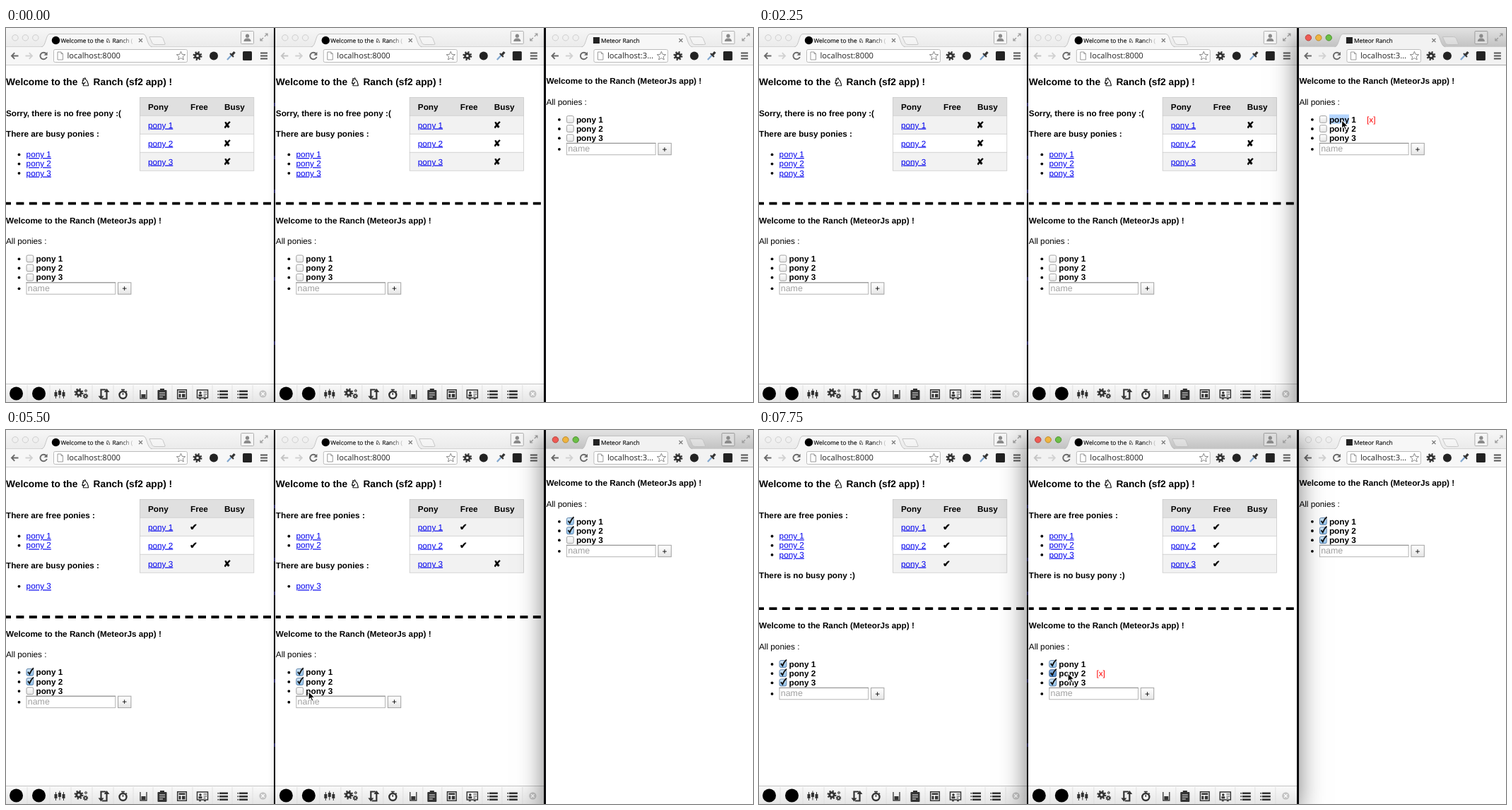
These frames come from a looping animation (1057x530 px, 8000 ms). An HTML page:

```html
<!DOCTYPE html>
<html lang="en">
<head>
<meta charset="utf-8">
<title>Pony ranch</title>
<style>
html, body { margin: 0; width: 100%; height: 100%; overflow: hidden; background: #08080c; }
#stage { position: relative; width: 1057px; height: 530px; overflow: hidden; }
svg { display: block; position: absolute; left: 0; top: 0; }
.speck { position: absolute; left: 379px; width: 2px; height: 5px; background: #3c3a78; }
.win { position: absolute; top: 0; height: 530px; background: #fff; box-shadow: 0 4px 10px rgba(0,0,0,.2); }
.win > svg { overflow: hidden; }
.win.active { z-index: 2; box-shadow: 0 12px 36px rgba(0,0,0,.6); }
text { font: 11.76px "Liberation Sans", Arial, sans-serif; white-space: pre; text-rendering: geometricPrecision; }
.b { font-weight: bold; }
.h { font-weight: bold; font-size: 13.76px; }
.knight { font: 16px "DejaVu Sans", sans-serif; stroke: #000; stroke-width: .5; }
.mark { font: 13px "DejaVu Sans", sans-serif; stroke: #000; stroke-width: .4; }
.link { fill: #00e; text-decoration: underline; }
.x { fill: #f00; }
.hint { fill: #a0a0a0; font-size: 12.4px; }
.tab { font: 8.4px "Open Sans", "Noto Sans", sans-serif; fill: url(#fade); stroke: url(#fade); stroke-width: .2; }
.url { font: 11.2px "Open Sans", "Noto Sans", sans-serif; fill: #222; }
.strip { fill: url(#idle); }
.active .strip { fill: url(#live); }
.bar { fill: #f7f7f7; }
.active .bar { fill: #f2f2f2; }
.edge { stroke: #cfcfcf; }
.active .edge { stroke: #a6a6a6; }
.user { fill: #f5f5f5; stroke: #b0b0b0; }
.active .user { fill: #dcdcdc; stroke: #9c9c9c; }
.light { fill: #f0f0f0; stroke: #cfcfcf; }
.active .l0 { fill: #ee5a54; stroke: #b9423b; }
.active .l1 { fill: #efb440; stroke: #bd8a28; }
.active .l2 { fill: #6cbf46; stroke: #4a922d; }
#cursor { z-index: 5; overflow: visible; }
</style>
</head>
<body>
<div id="stage">
  <svg width="0" height="0">
    <defs>
      <linearGradient id="idle" x2="0" y2="1"><stop stop-color="#f6f6f6"/><stop offset="1" stop-color="#ebebeb"/></linearGradient>
      <linearGradient id="live" x2="0" y2="1"><stop stop-color="#e2e2e2"/><stop offset="1" stop-color="#c2c2c2"/></linearGradient>
      <linearGradient id="off" x2="0" y2="1"><stop stop-color="#fff"/><stop offset="1" stop-color="#e6e6e6"/></linearGradient>
      <linearGradient id="on" x2="0" y2="1"><stop stop-color="#d9ecfa"/><stop offset="1" stop-color="#8cc0ec"/></linearGradient>
      <linearGradient id="down" x2="0" y2="1"><stop stop-color="#93b9e2"/><stop offset="1" stop-color="#4583c8"/></linearGradient>
      <linearGradient id="foot" x2="0" y2="1"><stop stop-color="#fafafa"/><stop offset="1" stop-color="#e6e6e6"/></linearGradient>
      <linearGradient id="fade" gradientUnits="userSpaceOnUse" x1="160" x2="182" y1="0" y2="0"><stop stop-color="#111"/><stop offset="1" stop-color="#111" stop-opacity="0"/></linearGradient>
    </defs>
  </svg>
  <svg id="cursor" width="12" height="16"><path d="M.6.6V12.4L3.4 9.9 5.3 14.3 7.4 13.4 5.6 9.2H9.4Z" stroke="#fff" stroke-width="1.1"/></svg>
</div>
<script>
const stage = document.getElementById('stage');
const cursor = document.getElementById('cursor');
const LOOP = 8000;
const LINE = 13.2;

// Each step changes some fields and keeps the rest. hover and press are [window, row].
const steps = [
  [0, { free: 0, active: -1, at: null, hover: null, press: null, picked: false }],
  [500, { at: [850, 182] }],
  [750, { at: [838, 139] }],
  [1000, { at: [825, 127] }],
  [1250, { at: [824, 130] }],
  [1500, { active: 2 }],
  [2000, { free: 1, hover: [2, 0], picked: true }],
  [2250, { free: 0 }],
  [3000, { free: 1, picked: false }],
  [3500, { at: [818, 139], hover: [2, 1] }],
  [3750, { at: [816, 143] }],
  [4000, { at: [816, 144], press: [2, 1] }],
  [4250, { free: 2, press: null }],
  [4750, { at: [515, 349], hover: null }],
  [5000, { at: [478, 353] }],
  [5250, { at: [431, 369] }],
  [5500, { at: [427.5, 370] }],
  [6000, { active: 1 }],
  [6500, { press: [1, 2], hover: [1, 2] }],
  [6750, { free: 3, press: null }],
  [7250, { at: [444, 353] }],
  [7500, { at: [440, 346], hover: [1, 1] }],
  [7750, { at: [436.5, 344], press: [1, 1] }]
];

// y is the middle of the line of text
const text = (x, y, s, cls = '') => `<text x="${x}" y="${y + 4.2}" class="${cls}">${s}</text>`;
const box = (x, y, w, h, more) => `<rect x="${x}" y="${y}" width="${w}" height="${h}" ${more}/>`;
const rect = (x, y, w, h, fill, more = '') => box(x, y, w, h, `fill="${fill}" ${more}`);
const circle = (x, y, r, fill, more = '') => `<circle cx="${x}" cy="${y}" r="${r}" fill="${fill}" ${more}/>`;
const line = (d, color, w = 1.5) => `<path d="${d}" fill="none" stroke="${color}" stroke-width="${w}"/>`;
const shape = (d, fill) => `<path d="${d}" fill="${fill}"/>`;
const bullet = y => circle(18.5, y + .5, 1.9, '#000');
const isAt = (spot, win, row) => spot && spot[0] === win && spot[1] === row;

function gear(x, y, r, hole) {
  const teeth = `stroke="#333" stroke-width="${r * .5}" stroke-dasharray="${r * .393}"`;
  return circle(x, y, r, 'none', teeth) + circle(x, y, r * .6, 'none', `stroke="#333" stroke-width="${r * .6}"`) + circle(x, y, r * .3, hole);
}

function tools(s) {
  return gear(271 + s, 39.5, 5.2, '#f7f7f7')
    + circle(294 + s, 39.5, 6, '#222')
    + line(`M${313 + s} 45l6-6.5`, '#7fa6cf', 2.2) + line(`M${317 + s} 36l5 5`, '#333', 2) + line(`M${320 + s} 38l3.5-4`, '#333', 3.4)
    + rect(335 + s, 33, 13, 13, '#222', 'rx="1.5"')
    + line(`M${360 + s} 35.5h10m-10 4h10m-10 4h10`, '#555', 1.8);
}

function chrome(win, width) {
  const small = win === 2, s = small ? -84.5 : 0;
  const back = win === 1 ? '#c4c4c4' : '#6a6a6a';
  const boxEnd = 257 + s, star = 247.5 + s;
  let out = box(-1, 0, width + 1, 27, 'class="strip"');
  [0, 1, 2].forEach(i => out += `<circle class="light l${i}" cx="${13 + 14.4 * i}" cy="13.8" r="4.2"/>`);
  out += `<path d="M203 12.5H218Q221 12.5 222 14.5L225 22Q226 23.5 223 23.5H211Q208 23.5 207 21.5L203.5 14Q203 12.5 203 12.5Z" fill="#fff" fill-opacity=".35" stroke="#bdbdbd" stroke-width=".8"/>`;
  out += box(-1, 26.5, width + 1, 26, 'class="bar"') + line(`M-1 26.5H${width}`, '#c9c9c9', .7);
  out += `<path class="bar" d="M50 27C57 26 56 8.5 62 8.5H194C200 8.5 199 26 207 27" stroke="#b9b9b9" stroke-width=".8"/>`;
  out += box(50, 27, 157, 2, 'class="bar"') + `<path class="edge" d="M-1 52.5H${width}"/>`;
  out += small
    ? rect(66.5, 13, 9, 9, '#222') + text(77.5, 16.3, 'Meteor Ranch', 'tab')
    : circle(70.5, 17.5, 5.7, '#000') + text(77.5, 16.3, 'Welcome to the ♘ Ranch (', 'tab');
  out += line('M188 15l5 5m0-5l-5 5', '#777', 1.1);

  const user = 332 + (small ? -84 : 0), full = 365 + (small ? -82.5 : 0);
  out += box(user + .5, 4.5, 18, 18, 'class="user" rx="1"')
    + circle(user + 9.5, 11.2, 2.6, '#8a8a8a') + shape(`M${user + 4.5} 19q0-4.5 5-4.5t5 4.5Z`, '#8a8a8a')
    + line(`M${full + 1} 12l4-4m-3.5 0h3.5v3.5M${full - 1} 14l-4 4m0-3.5v3.5h3.5`, '#9a9a9a', 1.2);

  out += line('M17.5 39.5H8m4.2-4.3L8 39.5l4.2 4.3', back, 1.9)
    + line('M27.5 39.5H37m-4.2-4.3L37 39.5l-4.2 4.3', '#d2d2d2', 1.9)
    + line('M57 36.5A4.8 4.8 0 1 0 57.8 41', '#6a6a6a', 1.9) + shape('M58.6 33.8V38.8H53.6Z', '#6a6a6a');
  out += rect(67.5, 30.5, boxEnd - 68, 18, '#fff', 'stroke="#bcbcbc" rx="2"')
    + `<path d="M73 34H78L80.5 36.5V45H73ZM78 34V36.5H80.5" fill="#fff" stroke="#999"/>`
    + text(86.5, 39.2, small ? 'localhost:3…' : 'localhost:8000', 'url');
  let d = '';
  for (let i = 0; i < 10; i++) {
    const a = i * Math.PI / 5, r = i % 2 ? 2.9 : 6.5;
    d += `${i ? 'L' : 'M'}${star + r * Math.sin(a)} ${39.7 - r * Math.cos(a)}`;
  }
  out += `<path d="${d}Z" fill="#fff" stroke="#888"/>` + tools(s);
  return out + (small ? '' : footer(width));
}

function footer(width) {
  const c = '#333';
  const stack = x => [513.5, 518, 522.5].map(y => rect(x - 5, y, 12, 2.6, c) + rect(x - 7.5, y + .4, 1.6, 1.8, c)).join('');
  let out = rect(-1, 504, width + 1, 26, 'url(#foot)') + line(`M-1 504.5H${width}`, '#c4c4c4', 1);
  [30, 62, 92, 122, 152, 180, 208, 235, 264, 292, 320, 349].forEach(x => out += line(`M${x} 506V530`, '#dedede', .8));
  out += circle(14.5, 518, 9.5, '#000') + circle(46.5, 518, 9.5, '#000');
  out += line('M70.5 513v12M76 511.5v13M81.5 513v12', c, 1) + rect(68.5, 516, 4, 6, c) + rect(74, 514, 4, 6, c) + rect(79.5, 516, 4, 6, c);
  out += gear(103, 517, 5.2, '#eee') + gear(112.5, 521.5, 3, '#eee') + gear(113, 514, 1.8, '#eee');
  out += line('M141 512.5H134.5V523M136 525.5H142.5V515', c, 2.2) + shape('M130.5 521.5h8l-4 5ZM138.5 516h8l-4-5Z', c);
  out += circle(165.5, 520, 5, '#fafafa', `stroke="${c}" stroke-width="2.4"`) + line('M165.5 520V517M163 512.5h5M165.5 512v3M169.5 514.5l1.5 1.5', c, 1.5);
  out += line('M190 513V525H199V513', c, 1.3) + rect(191.5, 519, 6, 5, c);
  out += rect(214.5, 513, 13, 14, c, 'rx="1"') + rect(218, 511, 6, 3.5, c) + line('M217 517h8m-8 3h8m-8 3h5', '#eee', 1.1);
  out += rect(242.7, 512.7, 12.6, 12.6, '#fafafa', `stroke="${c}" stroke-width="1.5"`) + rect(244.5, 514.5, 9, 2.5, c) + rect(244.5, 518.5, 3, 5, c) + rect(249, 518.5, 4.5, 5, c);
  out += rect(270.5, 513, 15, 11, '#fafafa', `stroke="${c}" stroke-width="1.5"`) + circle(275, 517, 1.8, c) + rect(272.5, 519.3, 5, 3, c)
    + line('M279.5 516h4.5m-4.5 3h4.5m-4.5 2.5h3', c, 1.2) + line('M273 525.5h3m4 0h3', c, 1.5);
  out += stack(307) + stack(335);
  return out + circle(363.5, 518.5, 5.2, '#c4c4c4') + line('M361.3 516.3l4.4 4.4m0-4.4l-4.4 4.4', '#fff', 1.3);
}

const pony = i => 'pony ' + (i + 1);

function links(from, to, y) {
  let out = '';
  for (let i = from; i < to; i++, y += LINE) out += bullet(y) + text(28.6, y, pony(i), 'link');
  return out;
}

function table(free) {
  let out = rect(189, 98, 162, 26, '#e0e0e0');
  [[201, 'Pony'], [261, 'Free'], [309, 'Busy']].forEach(([x, s]) => out += text(x, 111.3, s, 'b'));
  for (let i = 0; i < 3; i++) {
    const y = 124.3 + 26 * i;
    out += rect(189, y, 162, 26, i % 2 ? '#fff' : '#f2f2f2') + line(`M189 ${y}h162`, '#cbcbcb', .8)
      + text(201, y + 13, pony(i), 'link')
      + (i < free ? text(260, y + 13, '✔', 'mark') : text(307.6, y + 13, '✘', 'mark'));
  }
  return out + rect(189.4, 98.4, 161.4, 103.8, 'none', 'stroke="#cbcbcb" stroke-width=".8"');
}

function ranch(free) {
  const next = free ? 150 + LINE * free + 15.8 : 150;
  return text(0, 76.8, 'Welcome to the ', 'h') + text(105, 77.6, '♘', 'knight') + text(123.6, 76.8, 'Ranch (sf2 app) !', 'h')
    + text(0, 121.2, free ? 'There are free ponies :' : 'Sorry, there is no free pony :(', 'b')
    + links(0, free, 150)
    + text(0, next, free < 3 ? 'There are busy ponies :' : 'There is no busy pony :)', 'b')
    + links(free, 3, next + 28.9) + table(free);
}

function checkbox(y, on, down) {
  const fill = down ? 'down' : on ? 'on' : 'off';
  const edge = down ? '#3a5f90' : on ? '#5f82a8' : '#a0a0a0';
  return rect(29, y - 4.8, 9.8, 9.8, `url(#${fill})`, `stroke="${edge}" rx="2"`)
    + (on ? line(`M31 ${y - .5}L33.3 ${y + 2.6}Q35.5 ${y - 3} 39 ${y - 6}`, '#111', 1.9) : '');
}

function list(win, dy, s) {
  let out = text(0, 75 + dy, 'Welcome to the Ranch (MeteorJs app) !', 'b') + text(0, 104.3 + dy, 'All ponies :');
  for (let i = 0; i < 3; i++) {
    const y = 129.3 + LINE * i + dy;
    if (win === 2 && s.picked && !i) out += rect(42.5, y - 6.8, 28, 13.4, '#b4d5fe');
    out += bullet(y) + checkbox(y, i < s.free, isAt(s.press, win, i)) + text(42.5, y, pony(i), 'b');
    if (isAt(s.hover, win, i)) out += text(95.6, y, '[x]', 'x');
  }
  const y = 171.3 + dy;
  return out + bullet(y)
    + rect(29, y - 8, 125.7, 16.4, '#fff', 'stroke="#b4b4b4"') + line(`M28.5 ${y - 8}H155`, '#909090', 1)
    + text(30.8, y - .3, 'name', 'hint')
    + rect(158.5, y - 8, 18.4, 16.4, 'url(#off)', 'stroke="#a2a2a2"') + text(164.2, y, '+');
}

function page(win, s) {
  if (win === 2) return list(win, 0, s);
  const y = [248.6, 265, 265, 253.2][s.free];
  return ranch(s.free)
    + `<path d="M0 ${y}H379" stroke="#000" stroke-width="3.8" stroke-dasharray="11 7.4" stroke-dashoffset="4"/>`
    + list(win, y - 51.1, s);
}

[106, 181, 229, 353, 444].forEach(y => {
  const speck = document.createElement('div');
  speck.className = 'speck';
  speck.style.top = y + 'px';
  stage.append(speck);
});

// left edge, width and inset of the content
const wins = [[0, 379, 0], [381, 380, .8], [764, 300, .4]].map(([x, w, inset], i) => {
  const el = document.createElement('div');
  el.className = 'win';
  el.style.left = x + 'px';
  el.style.width = w + 'px';
  el.innerHTML = `<svg width="${w}" height="530"><g transform="translate(${inset})">${chrome(i, w)}<g class="page"></g></g></svg>`;
  stage.append(el);
  return { el, body: el.querySelector('.page') };
});

function show(s) {
  wins.forEach((w, i) => {
    w.el.classList.toggle('active', s.active === i);
    w.body.innerHTML = page(i, s);
  });
  cursor.style.display = s.at ? 'block' : 'none';
  if (s.at) cursor.style.transform = `translate(${s.at[0]}px, ${s.at[1]}px)`;
}

let shown = -1;
function tick() {
  const t = performance.now() % LOOP;
  const past = steps.filter(([at]) => at <= t);
  if (past.length !== shown) {
    shown = past.length;
    show(Object.assign({}, ...past.map(([, change]) => change)));
  }
  requestAnimationFrame(tick);
}
tick();
</script>
</body>
</html>
```
